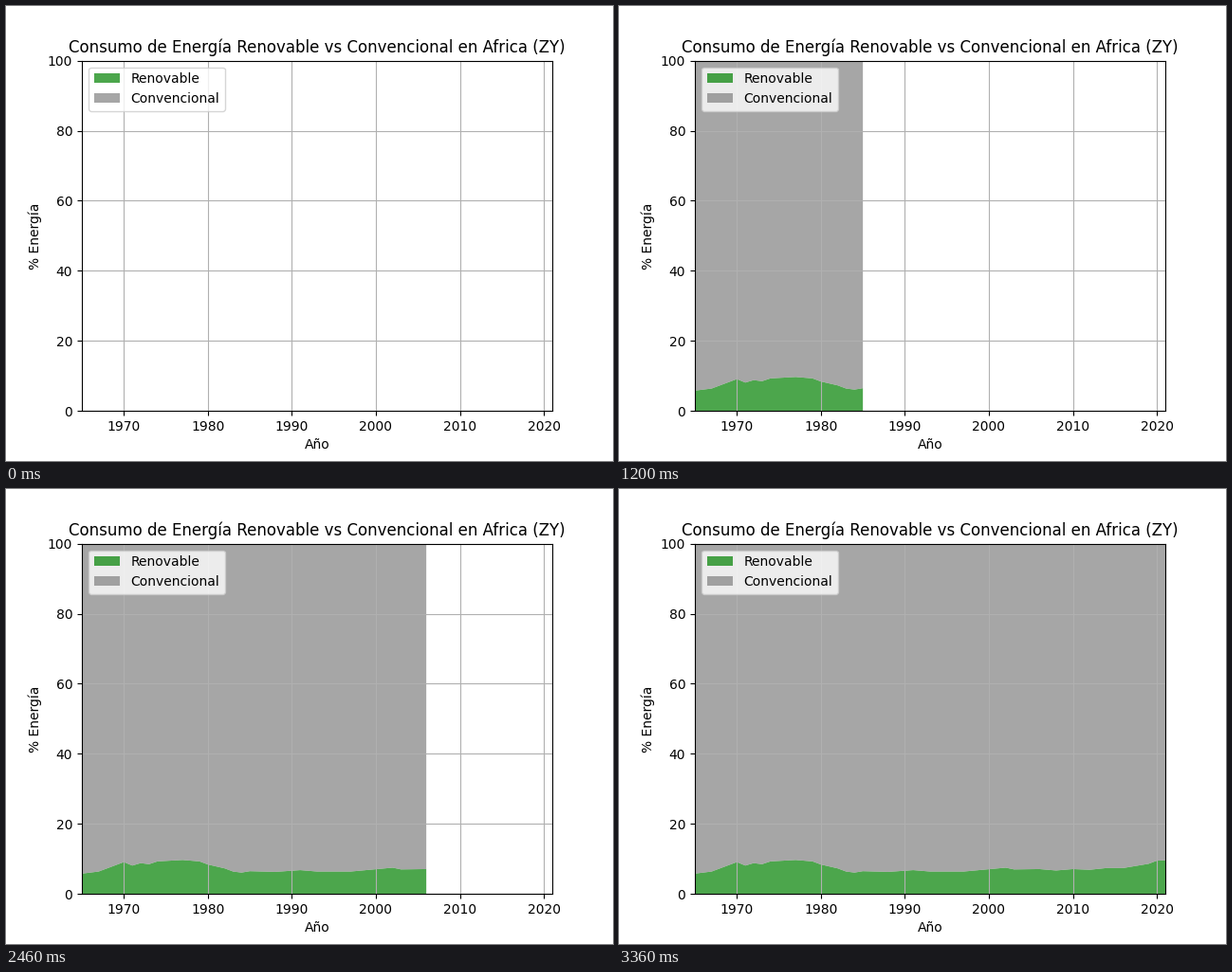
These frames come from a looping animation (640x480 px, 3420 ms). A matplotlib script:

```python
import matplotlib.pyplot as plt
import numpy as np
from matplotlib.animation import FuncAnimation
from matplotlib.patches import Patch

START, END = 1965, 2021
COLORS = ["green", "gray"]
LABELS = ["Renovable", "Convencional"]
ALPHA = 0.7

# Turning points of the renewable share; the years between are interpolated.
TURNS = {
    1965: 5.8, 1967: 6.4, 1970: 9.1, 1971: 8.1, 1972: 8.8, 1973: 8.5,
    1974: 9.3, 1977: 9.7, 1979: 9.3, 1980: 8.4, 1982: 7.3, 1983: 6.4,
    1984: 6.1, 1985: 6.5, 1988: 6.3, 1991: 6.8, 1993: 6.4, 1997: 6.4,
    2002: 7.5, 2003: 7.0, 2006: 7.1, 2008: 6.7, 2010: 7.1, 2012: 6.9,
    2014: 7.4, 2016: 7.4, 2019: 8.6, 2020: 9.5, 2021: 9.6,
}

years = np.arange(START, END + 1)
renewable = np.interp(years, list(TURNS), list(TURNS.values()))

fig, ax = plt.subplots(figsize=(6.4, 4.8), dpi=100)
ax.set_title("Consumo de Energía Renovable vs Convencional en Africa (ZY)")
ax.set_xlabel("Año")
ax.set_ylabel("% Energía")
ax.grid(True)
ax.legend(
    handles=[Patch(facecolor=c, alpha=ALPHA, linewidth=0, label=name)
             for c, name in zip(COLORS, LABELS)],
    loc="upper left",
)
areas = []


def update(i):
    """Show the stacked shares up to the i-th year."""
    while areas:
        areas.pop().remove()
    x, share = years[:i + 1], renewable[:i + 1]
    areas.extend(ax.stackplot(x, share, 100 - share, colors=COLORS, alpha=ALPHA))
    ax.set_xlim(START, END)
    ax.set_ylim(0, 100)
    return areas


anim = FuncAnimation(fig, update, frames=len(years), init_func=lambda: update(0),
                     interval=60, repeat=True, repeat_delay=0)
plt.show()
```
